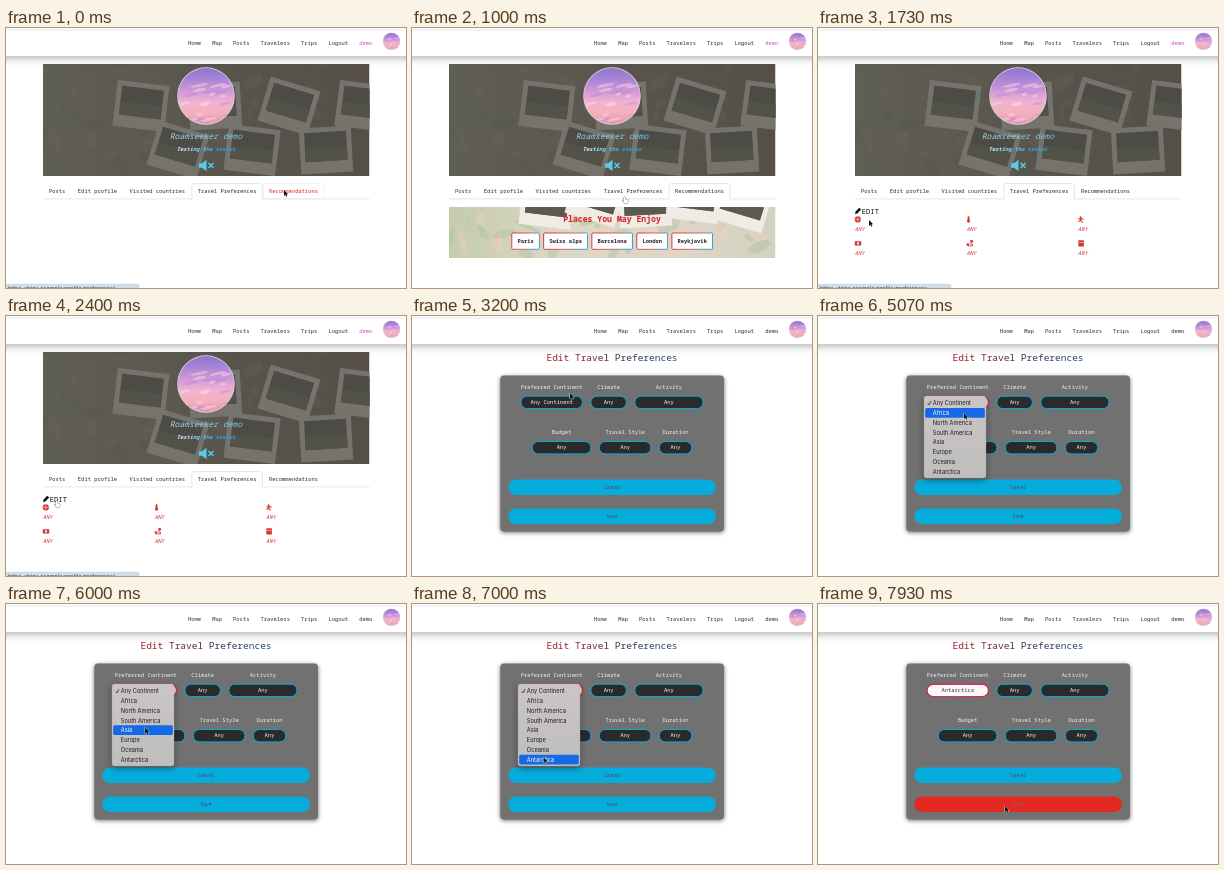
Recreate the animation shown at these times as an HTML page with a canvas. Size 400x260 px, loop 8000 ms.

```html
<!DOCTYPE html>
<html lang="en">
<head>
<meta charset="utf-8">
<title>Travel preferences</title>
<style>
html, body { margin: 0; width: 100%; height: 100%; overflow: hidden; background: #fff; }
canvas { display: block; width: 400px; height: 260px; }
</style>
</head>
<body>
<canvas id="stage"></canvas>
<script>
const canvas = document.getElementById('stage');
const c = canvas.getContext('2d');
const dpr = window.devicePixelRatio || 1;
canvas.width = 400 * dpr;
canvas.height = 260 * dpr;

const LOOP = 8000;
const MONO = '"Noto Sans Mono", "DejaVu Sans Mono", monospace';
const SANS = 'Inter, "Liberation Sans", sans-serif';
const CYAN = '#06acdc', RED = '#e02424', INK = '#2b2b2b', RULE = '#d9dde1';
const SIZE = 5.45, CHAR = SIZE * 0.6;

// Moments when the page switches
const SHOW_RECS = 150, SHOW_PREFS = 1300, SHOW_FORM = 2800;
const OPEN_MENU = 4000, CLOSE_MENU = 7270;

// Pointer moves: where to, when, how long
const MOVES = [
  { x: 278, y: 162, at: 0, ms: 1 },
  { x: 212, y: 169, at: 200, ms: 700 },
  { x: 51, y: 192, at: 1300, ms: 430 },
  { x: 50, y: 185, at: 1800, ms: 350 },
  { x: 158, y: 77, at: 2800, ms: 400 },
  { x: 146, y: 87, at: 3670, ms: 250 },
  { x: 146, y: 97, at: 4400, ms: 450 },
  { x: 131.5, y: 153, at: 5250, ms: 1550 },
  { x: 187, y: 202, at: 7270, ms: 500 }
];

const CONTINENTS = ['Any Continent', 'Africa', 'North America', 'South America',
  'Asia', 'Europe', 'Oceania', 'Antarctica'];
const ROW = 9.78, MENU_TOP = 82.2;

function pointer(t) {
  let { x, y } = MOVES[0];
  for (const m of MOVES) {
    const k = Math.max(0, Math.min(1, (t - m.at) / m.ms));
    const e = k * k * (3 - 2 * k);
    x += (m.x - x) * e;
    y += (m.y - y) * e;
  }
  return { x, y };
}

function seeded(seed) {
  return () => (seed = (seed * 16807) % 2147483647) / 2147483647;
}

function text(s, x, y, color = INK, size = SIZE, style = '', align = 'left', font = MONO) {
  c.font = `${style} ${size}px ${font}`;
  c.textAlign = align;
  c.fillStyle = color;
  c.fillText(s, x, y);
}

// Lays labels out in a line, each box as wide as its text plus padding
function flow(labels, x, gap, pad, draw) {
  labels.forEach((s, i) => {
    const w = s.length * CHAR + 2 * pad;
    draw(s, x, w, i);
    x += w + gap;
  });
}

function rect(x, y, w, h, color) {
  c.fillStyle = color;
  c.fillRect(x, y, w, h);
}

function paint(fill, stroke, line) {
  if (stroke) { c.strokeStyle = stroke; c.lineWidth = line; c.stroke(); }
  if (fill) { c.fillStyle = fill; c.fill(); }
}

function round(x, y, w, h, r, fill, stroke, line = 1) {
  c.beginPath();
  c.roundRect(x, y, w, h, r);
  paint(fill);
  paint(null, stroke, line);
}

function blob(x, y, rx, ry, angle, fill) {
  c.beginPath();
  c.ellipse(x, y, rx, ry, angle, 0, 7);
  paint(fill);
}

const disc = (x, y, r, fill) => blob(x, y, r, r, 0, fill);

function shape(path, x, y, fill, stroke, line) {
  c.save();
  c.translate(x, y);
  const p = new Path2D(path);
  if (stroke) { c.strokeStyle = stroke; c.lineWidth = line; c.stroke(p); }
  if (fill) { c.fillStyle = fill; c.fill(p); }
  c.restore();
}

function fade(x0, y0, x1, y1, ...colors) {
  const g = c.createLinearGradient(x0, y0, x1, y1);
  colors.forEach((col, i) => g.addColorStop(i / (colors.length - 1), col));
  return g;
}

function shadow(color, blur, y, draw) {
  c.save();
  c.shadowColor = color;
  c.shadowBlur = blur * dpr;
  c.shadowOffsetY = y * dpr;
  draw();
  c.restore();
}

function clipped(outline, draw) {
  c.save();
  c.beginPath();
  outline();
  c.clip();
  draw();
  c.restore();
}

function sky(x, y, r) {
  disc(x, y, r * 1.02 + 0.2, '#e2d8e4');
  clipped(() => c.arc(x, y, r, 0, 7), () => {
    rect(x - r, y - r, 2 * r, 2 * r,
      fade(x, y - r, x, y + r, '#8d78cc', '#a984d6', '#cf96d8', '#efb2d0', '#f3b0c0', '#e693b0'));
    const rnd = seeded(11);
    for (let i = 0; i < 22; i++) {
      const v = rnd() * 1.3 - 0.4;
      blob(x + (rnd() * 2 - 1) * r, y + v * r, r * (0.1 + rnd() * 0.25), r * 0.05, -0.2,
        i % 3 ? 'rgba(255,220,228,.5)' : 'rgba(170,120,205,.3)');
    }
  });
}

// Map and a scatter of instant prints, as seen through a box
function photo(x, y, w, h, look) {
  clipped(() => c.rect(x, y, w, h), () => {
    rect(x, y, w, h, fade(x, 0, x + w, 0, ...look.map));
    const rnd = seeded(5);
    for (let i = 0; i < 40; i++) {
      blob(x + rnd() * w, y + rnd() * h, 3 + rnd() * 12, 2 + rnd() * 4, rnd() * 3, look.spots[i % 2]);
    }
    for (let i = 0; i < look.prints; i++) {
      const row = i % 2;
      c.save();
      c.translate(x + 98 + i * look.step, y + look.top + row * look.drop);
      c.rotate(0.12 + Math.sin(i * 2.1) * 0.2);
      rect(-26, -23, 52, 46, look.paper);
      rect(-21, -18, 42, 29, look.picture);
      rect(-21, -2, 42, 13, look.ground);
      c.restore();
    }
  });
}

const DIM = {
  map: ['#605f55', '#5c594f', '#57534c', '#554f47'],
  spots: ['rgba(76,84,70,.22)', 'rgba(112,104,90,.2)'],
  prints: 7, step: 37, top: 42, drop: 44,
  paper: '#76736d', picture: '#4c4b45', ground: '#535249'
};
const BRIGHT = {
  map: ['#c4ccae', '#dcd7c5', '#e0d6c6', '#d3d2c0'],
  spots: ['rgba(146,178,146,.28)', 'rgba(240,208,188,.4)'],
  prints: 5, step: 49, top: -3, drop: -6,
  paper: '#efebe5', picture: '#757060', ground: '#5c5a50'
};

function hero() {
  photo(37, 36, 326.5, 112, DIM);
  sky(200, 68, 28);
  text('Roamseeker demo', 200, 111, fade(164, 0, 236, 0, '#a9d7e4', '#6fc4e6'), 8.05, 'italic', 'center');
  text('Testing the status', 200, 123, fade(170, 0, 229, 0, '#eefaff', '#8fdcf6', '#28aee0', '#2a9fd0'), SIZE, 'italic bold', 'center');
  shape('M0 3.5h3l4.5-3.5v11.4l-4.5-3.4h-3z', 193, 131.8, '#5cc9ea');
  shape('M0 0l5 5m0-5l-5 5', 202.5, 135, null, '#5cc9ea', 1.5);
}

function nav(userColor) {
  shadow('rgba(0,0,0,.32)', 8, 2, () => rect(-10, 2, 420, 26, '#fff'));
  rect(0, 0, 400, 2, '#fff');
  rect(0, 1.6, 400, 0.8, '#e2e2e2');
  flow(['Home', 'Map', 'Posts', 'Travelers', 'Trips', 'Logout', 'demo'], 182, 11.1, 0,
    (s, x, w, i) => text(s, x, 17.3, i === 6 ? userColor : INK));
  sky(385.5, 13.3, 8.4);
}

function tabs(active, hover) {
  rect(37, 170.6, 326.5, 0.7, RULE);
  const labels = ['Posts', 'Edit profile', 'Visited countries', 'Travel Preferences', 'Recommendations'];
  flow(labels, 37.2, 0.9, 5.8, (s, x, w, i) => {
    const hot = i === hover && i !== active;
    if (i === active) {
      round(x, 155.6, w, 16, [2, 2, 0, 0], '#fff', RULE, 0.7);
      rect(x + 0.4, 170, w - 0.8, 3, '#fff');
    } else if (hot) {
      round(x, 155.6, w, 15.4, [2, 2, 0, 0], null, '#e6e8eb', 0.6);
    }
    text(s, x + 5.8, 165, hot ? RED : INK);
  });
}

function places() {
  photo(37, 179, 326.5, 51, BRIGHT);
  text('Places You May Enjoy', 200, 194, '#dc1d25', 8.15, 'bold', 'center');
  flow(['Paris', 'Swiss alps', 'Barcelona', 'London', 'Reykjavik'], 99.8, 4.3, 5.6, (s, x, w) => {
    round(x, 205, w, 16.3, 1, '#fff', fade(x, 205, x + w, 221, '#dc3038', '#d8606a', '#22acdc'), 1);
    text(s, x + w / 2, 215.2, '#222', SIZE, 'bold', 'center');
  });
}

function prefs() {
  const col = '#d93232';
  shape('M0 6.3l.6-2.5 3.6-3.8 2 1.9-3.8 3.8z', 37, 179.7, '#111');
  text('EDIT', 43.7, 185.6, '#111', 7.2);
  // globe, thermometer, runner
  disc(39.8, 191.4, 3.1, col);
  shape('M-3 0h6M0-3v6', 39.8, 191.4, null, '#fff', 0.45);
  round(149.6, 188.2, 1.9, 5, 0.9, col);
  disc(150.5, 193.1, 1.6, col);
  disc(262.6, 189.2, 0.9, col);
  shape('M-2.5 .6l2.5-.6 2.5 1M0 0l-.6 1.8 2.2 2.2M-.6 1.8l-2 1.4', 263, 190.4, null, col, 1.1);
  // banknote, route, calendar
  round(36.8, 213.2, 6.4, 4.4, 0.5, col);
  disc(40, 215.4, 1.1, '#fff');
  disc(153.6, 213.3, 1.5, col);
  disc(149.8, 216.6, 1.3, col);
  shape('M0 0h4.7v-1.7l-3-.6', 149.8, 217.9, null, col, 0.9);
  round(260.3, 212.2, 5.6, 6.2, 0.6, col);
  rect(260.6, 214.1, 5, 0.5, '#fff');
  for (let i = 0; i < 6; i++) {
    text('ANY', 36.8 + (i % 3) * 111.6, i < 3 ? 203 : 227, col, SIZE, 'italic');
  }
}

// A centred row of selects, each { label, value, w, focus }
function fields(y, list) {
  const gap = 7.4;
  let x = 200 - (list.reduce((sum, f) => sum + f.w + gap, -gap)) / 2;
  for (const { label, value = 'Any', w, focus } of list) {
    const mid = x + w / 2;
    const edge = focus ? fade(x, y, x + w, y + 13, '#e02335', '#c73c78', '#e02335') : CYAN;
    text(label, mid, y - 6.6, '#f1f1f1', SIZE, '', 'center');
    round(x + 0.5, y + 0.5, w - 1, 12.4, 6, focus ? '#fbf9fb' : '#2a2a2c', edge, focus ? 1.4 : 1);
    text(value, mid, y + 8.4, focus ? '#333' : '#f3f3f3', SIZE, '', 'center');
    x += w + gap;
  }
}

function button(label, y, hot) {
  round(96.3, y, 207.7, 15.6, 7.8, hot ? '#e22a22' : '#05addc');
  text(label, 200, y + 9.3, hot ? '#a85a66' : fade(192, 0, 208, 0, '#7c3040', '#3c4468'), 4.55, '', 'center');
}

function form(t, p) {
  const focus = t >= OPEN_MENU, picked = t >= CLOSE_MENU;
  text('Edit Travel Preferences', 200, 45.4,
    fade(134, 0, 265, 0, '#b0141c', '#7a2334', '#4a2a48', '#283c62', '#254a74'), 9.5, '', 'center');
  shadow('rgba(0,0,0,.6)', 4, 1.2, () => round(88.3, 59.6, 223.7, 155.8, 4, '#717171'));
  fields(79.7, [
    { label: 'Preferred Continent', value: CONTINENTS[picked ? 7 : 0], w: 62.5, focus },
    { label: 'Climate', w: 36.5 },
    { label: 'Activity', w: 69.2 }
  ]);
  fields(125, [
    { label: 'Budget', w: 59.6 },
    { label: 'Travel Style', w: 52.6 },
    { label: 'Duration', w: 33.4 }
  ]);
  button('Cancel', 163.4);
  button('Save', 192.4, picked && p.y > 193);
  if (focus && !picked) menu(p);
}

function menu(p) {
  shadow('rgba(0,0,0,.4)', 7, 2.5, () => round(106, 80, 62, 82, 3, '#c6c2c2'));
  round(106, 80, 62, 82, 3, fade(0, 80, 0, 162, '#cbc5c6', '#bfbdbd'), '#aaa7a7', 0.4);
  const on = Math.max(0, Math.min(7, Math.floor((p.y - MENU_TOP) / ROW)));
  CONTINENTS.forEach((s, i) => {
    const y = MENU_TOP + i * ROW;
    const color = i === on ? '#fff' : '#1c1c1c';
    if (i === on) round(107.2, y, 59.6, ROW, 1.5, '#1469e6');
    text(s, 114.8, y + 7, color, 5.7, '', 'left', SANS);
    if (!i) shape('M0 2.3l1.2 1.5 2-3.8', 109.8, y + 2.9, null, color, 0.8);
  });
}

function statusBar() {
  round(-2, 256.2, 135, 8, [0, 2, 0, 0], '#d2dde6', '#b7c4ce', 0.5);
  text('https://trips.example/profile/preferences', 2, 262.8, '#444', 5.6, '', 'left', SANS);
}

function cursor({ x, y }, link) {
  if (link) shape('M0 0h1l.2 2.3 2.6.5.2 1.8-.8 2h-2.8l-2.2-2.7.7-.5 1.1.8z', x, y, '#fff', '#333', 0.6);
  else shape('M0 0v5.9l1.4-1.2.9 2 1-.5-.9-1.9 1.8-.1z', x, y, '#111', '#fff', 0.7);
}

function draw(t) {
  const p = pointer(t);
  const onForm = t >= SHOW_FORM, onPrefs = t >= SHOW_PREFS;
  const link = !onForm && p.y > 163 && p.y < 190;
  c.setTransform(dpr, 0, 0, dpr, 0, 0);
  rect(0, 0, 400, 260, '#fff');
  if (onForm) {
    form(t, p);
  } else {
    const recs = t >= SHOW_RECS && !onPrefs;
    hero();
    tabs(recs ? 4 : 3, t < SHOW_RECS ? 4 : -1);
    if (recs) places();
    else if (onPrefs) prefs();
    if (!recs) statusBar();
  }
  nav(onForm ? INK : '#cf4cc0');
  cursor(p, link);
}

function tick() {
  draw(performance.now() % LOOP);
  requestAnimationFrame(tick);
}
tick();
</script>
</body>
</html>
```
